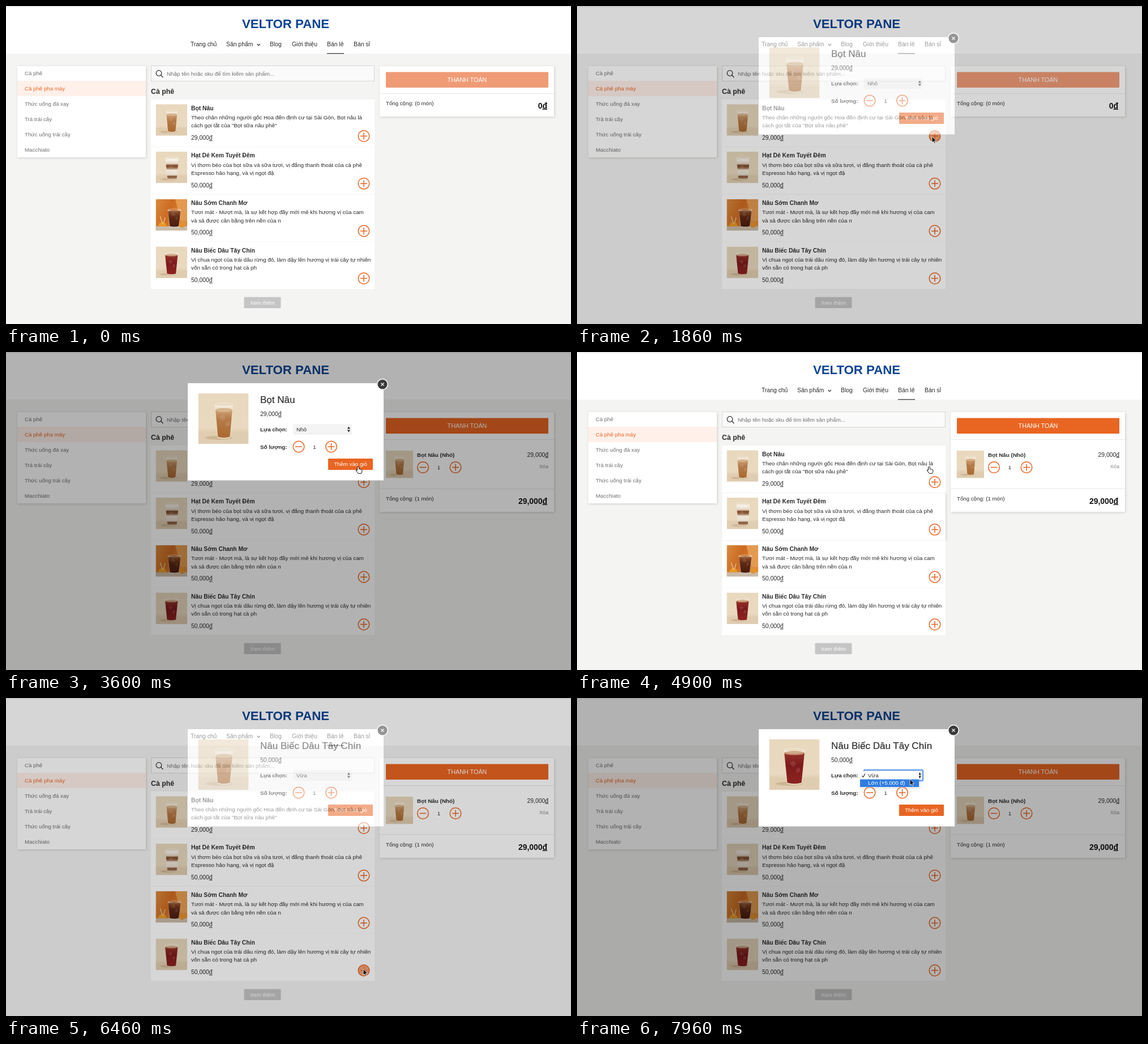
An HTML page for the animation above (8000 ms loop, 998 px wide and 561 px high).

```html
<!DOCTYPE html>
<html lang="vi">
<head>
<meta charset="utf-8">
<title>Bán lẻ</title>
<style>
html, body { margin: 0; width: 100%; height: 100%; overflow: hidden; background: #f4f4f3; }
svg { display: block; }
text { font-family: "Liberation Sans", Arial, sans-serif; white-space: pre; }
.card { fill: #fff; filter: drop-shadow(1px 1px 2px rgba(0, 0, 0, .16)); }
</style>
</head>
<body>
<svg id="stage" width="998" height="561" viewBox="0 0 998 561">
  <defs>
    <linearGradient id="wall" x2="0" y2="1">
      <stop stop-color="#e8d8bd"/><stop offset=".68" stop-color="#e9d9c0"/><stop offset=".78" stop-color="#e0cdb0"/><stop offset="1" stop-color="#dfcdb2"/>
    </linearGradient>
    <linearGradient id="sun" x2="1" y2=".4">
      <stop stop-color="#d98a3c"/><stop offset=".5" stop-color="#cc6a22"/><stop offset="1" stop-color="#e08a3a"/>
    </linearGradient>
    <linearGradient id="milk" x2="0" y2="1">
      <stop stop-color="#cda277"/><stop offset=".3" stop-color="#b67c4b"/><stop offset="1" stop-color="#a9682f"/>
    </linearGradient>
    <linearGradient id="layers" x2="0" y2="1">
      <stop stop-color="#f3ece2"/><stop offset=".18" stop-color="#e6d6c4"/><stop offset=".28" stop-color="#7a4526"/><stop offset=".4" stop-color="#9a6a48"/><stop offset=".52" stop-color="#efe6da"/><stop offset=".76" stop-color="#e8dccd"/><stop offset=".86" stop-color="#7d4a2b"/><stop offset="1" stop-color="#c9ad92"/>
    </linearGradient>
    <linearGradient id="cola" x2="0" y2="1">
      <stop stop-color="#8a4a26"/><stop offset=".4" stop-color="#5c2814"/><stop offset="1" stop-color="#4a1d10"/>
    </linearGradient>
    <linearGradient id="berry" x2="0" y2="1">
      <stop stop-color="#92332a"/><stop offset=".4" stop-color="#7e1a1b"/><stop offset="1" stop-color="#8c2420"/>
    </linearGradient>
  </defs>
</svg>
<script>
const ORANGE = '#e96522', INK = '#2b2b2b', GREY = '#707070';
const DONG = '<tspan text-decoration="underline">đ</tspan>';
const stage = document.getElementById('stage');

const text = (x, y, s, size = 9.85, fill = INK, extra = '') =>
  `<text x="${x}" y="${y}" font-size="${size}" fill="${fill}" ${extra}>${s}</text>`;
const BOLD = 'font-weight="700" ', MID = 'text-anchor="middle" ', END = 'text-anchor="end" ';
const rect = (x, y, w, h, fill, extra = '') =>
  `<rect x="${x}" y="${y}" width="${w}" height="${h}" fill="${fill}" ${extra}/>`;
const path = (d, stroke, width = 1, fill = 'none') =>
  `<path d="${d}" stroke="${stroke}" stroke-width="${width}" fill="${fill}"/>`;
const ring = (x, y, plus = true) =>
  `<circle cx="${x}" cy="${y}" r="9.8" fill="none" stroke="${ORANGE}" stroke-width="1.5"/>` +
  path(`M${x - 6} ${y}h12` + (plus ? `M${x} ${y - 6}v12` : ''), ORANGE, 1.5);
const photo = (kind, x, y, size, extra = '') =>
  `<use href="#${kind}" width="${size}" height="${size}" x="${x}" y="${y}" ${extra}/>`;

// A tapered glass between left and right, filled from level down to the base.
function drink(id, liquid, foam, left, right, rim, level) {
  const base = 88, mid = (left + right) / 2, half = (right - left) / 2, foot = half * .72;
  const inset = (half - foot) * (level - rim) / (base - rim), fill = half - inset - .5;
  const scene = id === 'citrus'
    ? rect(0, 0, 100, 100, 'url(#sun)') + path('M62 0H100V70H80Z', 'none', 0, '#e39a50') + rect(0, 86, 100, 14, '#c9bba8') +
      path('M8 86A13 13 0 0 1 34 86Z', 'none', 0, '#e79a25') + path('M22 78L14 55M25 76L30 58', '#e9d6a8', 2) +
      '<circle cx="84" cy="82" r="9" fill="#e2922c"/>'
    : rect(0, 0, 100, 100, 'url(#wall)') + `<ellipse cx="${mid - 10}" cy="${base}" rx="27" ry="4" fill="#b99a72" opacity=".45"/>`;
  return `<symbol id="${id}" viewBox="0 0 100 100">${scene}
    <path d="M${left} ${rim}H${right}L${mid + foot} ${base}Q${mid} ${base + 4} ${mid - foot} ${base}Z" fill="#f5ebdc" opacity=".65"/>
    <path d="M${mid - fill} ${level}H${mid + fill}L${mid + foot - 1} ${base - 2}Q${mid} ${base + 2} ${mid - foot + 1} ${base - 2}Z" fill="url(#${liquid})"/>
    <ellipse cx="${mid}" cy="${level}" rx="${fill}" ry="4" fill="${foam}"/>
    <path d="M${mid - 10} 47l8-5 6 7-7 6zM${mid + 3} 59l7-4 2 8-7 4z" fill="#fff" opacity=".1"/>
    <ellipse cx="${mid}" cy="${rim}" rx="${half}" ry="4" fill="none" stroke="#fff" opacity=".5"/></symbol>`;
}

const products = [
  ['latte', 'Bọt Nâu', 'Theo chân những người gốc Hoa đến định cư tại Sài Gòn, Bọt nâu là', 'cách gọi tắt của "Bọt sữa nâu phê"', '29,000'],
  ['layered', 'Hạt Dẻ Kem Tuyết Đêm', 'Vị thơm béo của bọt sữa và sữa tươi, vị đắng thanh thoát của cà phê', 'Espresso hảo hạng, và vị ngọt đậ', '50,000'],
  ['citrus', 'Nâu Sớm Chanh Mơ', 'Tươi mát - Mượt mà, là sự kết hợp đầy mới mẻ khi hương vị của cam', 'và sả được cân bằng trên nền của n', '50,000'],
  ['red', 'Nâu Biếc Dâu Tây Chín', 'Vị chua ngọt của trái dâu rừng đỏ, làm dậy lên hương vị trái cây tự nhiên', 'vốn sẵn có trong hạt cà ph', '50,000']
];

const header = rect(0, 0, 998, 84, '#fff') + rect(0, 0, 998, 2, '#ebebeb') +
  text(494, 38.5, 'VELTOR PANE', 22.2, '#0b4394', BOLD + MID) +
  [[326, 'Trang chủ'], [389, 'Sản phẩm'], [466, 'Blog'], [505, 'Giới thiệu'], [567, 'Bán lẻ'], [614, 'Bán sỉ']]
    .map(([x, s]) => text(x, 71, s, 10.4)).join('') +
  path('M443.5 67l2.7 2.7 2.7-2.7', INK, 1.3) + rect(567, 83, 30, 1.5, '#555');

const sidebar = '<rect class="card" x="20" y="106" width="227" height="161"/>' + rect(20, 132, 227, 27, '#fff0ea') +
  ['Cà phê', 'Cà phê pha máy', 'Thức uống đá xay', 'Trà trái cây', 'Thức uống trái cây', 'Macchiato']
    .map((s, i) => text(33, 122 + 27 * i, s, 9.7, i === 1 ? ORANGE : GREY)).join('');

const list = rect(256.5, 105.5, 394, 27, '#fafafa', 'stroke="#d6d6d6"') +
  `<circle cx="270" cy="118.5" r="4.8" fill="none" stroke="${INK}" stroke-width="1.2"/>` + path('M273.5 122l4 4', INK, 1.3) +
  text(284, 122.5, 'Nhập tên hoặc sku để tìm kiếm sản phẩm...', 9.85, GREY) +
  text(256, 155, 'Cà phê', 12.3, INK, BOLD) +
  '<rect id="hover" class="card" x="257" y="249" width="394" height="83"/>' +
  products.map(([kind, name, line1, line2, price], i) => {
    const y = 165 + 83.7 * i;
    return rect(256, y, 395, 83, '#fff') + photo(kind, 264.5, y + 8.3, 55.5) +
      text(327, y + 18.5, name, 10.3, INK, BOLD) + text(327, y + 34.8, line1) + text(327, y + 49.2, line2) +
      text(327, y + 71, price + DONG, 10.4) + ring(632, y + 64.5);
  }).join('') +
  [0, 251.1].map((dy, i) => `<circle id="press${i}" cx="632" cy="${229.5 + dy}" r="10" fill="${ORANGE}" opacity="0"/>`).join('') +
  rect(420.5, 513.5, 65, 19.5, '#c5c5c5', 'rx="1"') + text(453, 526.5, 'Xem thêm', 9.7, '#fff', MID);

const cart = (count, height, sum, active) => {
  const bottom = 106 + height;
  return `<g id="cart${count}"><rect class="card" x="660" y="106" width="308" height="${height}"/>` +
    rect(671, 116.5, 287, 27.5, active ? ORANGE : '#ef9b76', 'rx="1"') + text(814.5, 134.3, 'THANH TOÁN', 10.8, '#fff', MID) +
    rect(660, 154, 308, 1, '#e8e8e8') + text(671, bottom - 20, `Tổng cộng: (${count} món)`, 9.7) +
    text(956, bottom - 14.5, sum + DONG, 13.9, '#111', BOLD + END) +
    (active ? photo('latte', 670.5, 174, 48.5) + text(726, 184.5, products[0][1] + ' (Nhỏ)', 9.9, INK, BOLD) +
      ring(736.5, 203.5, false) + text(764.5, 207, '1', 9.85, INK, MID) + ring(794, 203.5) +
      text(958, 184.5, sum + DONG, 10.4, INK, END) + text(958, 205, 'Xóa', 9.2, '#888', END) + rect(660, 240.5, 308, 1, '#e8e8e8') : '') + '</g>';
};

// Shade and dialog fade as one layer.
const modal = '<g id="modal">' + rect(0, 0, 998, 561, '#000', 'opacity=".3"') + rect(321, 55, 346, 171.5, '#fff') +
  photo('latte', 339.5, 73, 89, 'id="picture"') +
  text(449, 90, '', 17, INK, 'id="name" stroke="#2b2b2b" stroke-width=".2"') + text(449, 113, '', 10.4, INK, 'id="price"') +
  text(449, 139.5, 'Lựa chọn:', 9.85, INK, BOLD) + rect(507, 127, 104, 19, '#f3f3f3', 'id="select" rx="2"') +
  text(513, 140, '', 9.85, INK, 'id="option"') + path('M602.8 135.5l2.6-4 2.6 4zM602.8 137.5l2.6 4 2.6-4z', 'none', 0, INK) +
  text(449, 170.5, 'Số lượng:', 9.85, INK, BOLD) + ring(517, 167, false) + text(545, 170.7, '1', 9.85, INK, MID) + ring(574.5, 167) +
  rect(569, 188, 79, 20, ORANGE, 'rx="1"') + text(608.5, 201.3, 'Thêm vào giỏ', 9.7, '#fff', MID) +
  '<circle cx="665" cy="57" r="9.3" fill="#3a3a3a" stroke="#fff" stroke-width="1.5"/>' + path('M662.5 54.5l5 5m0-5l-5 5', '#fff', 1.2) + '</g>';

const menu = '<g id="menu"><rect class="card" x="500" y="129" width="104" height="28.5" rx="1"/>' +
  rect(500, 143.5, 104, 13.5, '#2f7de1', 'id="mark"') + path('M503.5 137l2 2.5 3.5-6', INK, 1.2) +
  text(514, 140, 'Vừa', 9.85, INK, 'id="medium"') + text(514, 153.3, 'Lớn (+5.000 đ)', 9.85, '#fff', 'id="large"') + '</g>';

// Both pointers have their tip at the local origin.
const cursor = '<g id="cursor"><path id="arrow" d="M0 0V11L2.5 8.7 4.3 12.5 6 11.7 4.3 8H7.8Z" fill="#111" stroke="#fff" stroke-width=".8"/>' +
  '<path id="hand" d="M-1.5 1Q0-1 1.3 1V4.5Q2.5 3.8 3.5 5 4.5 4.3 5.3 5.5 6.8 5.3 7 6.8 7 10 5.5 12.3H.3L-3.8 7Q-3.8 5-1.5 6.7Z" fill="#fff" stroke="#111"/></g>';

stage.insertAdjacentHTML('beforeend',
  drink('latte', 'milk', '#d6b48e', 33, 69, 23, 33) + drink('layered', 'layers', '#f4eee6', 30, 74, 20, 27) +
  drink('citrus', 'cola', '#8d5530', 38, 80, 34, 39) + drink('red', 'berry', '#c99a78', 29, 71, 22, 27) +
  header + sidebar + list + cart(0, 89, '0', false) + cart(1, 176, '29,000', true) +
  modal + photo('latte', 0, 0, 89, 'id="flyer" opacity=".5"') + menu + cursor);

const el = Object.fromEntries([...stage.querySelectorAll('[id]')].map(n => [n.id, n]));
const set = (id, attrs) => { for (const k in attrs) el[id].setAttribute(k, attrs[k]); };
const show = (id, on) => set(id, { visibility: on ? 'visible' : 'hidden' });
const ramp = (t, a, b) => Math.min(1, Math.max(0, (t - a) / (b - a)));
const ease = p => p * p * (3 - 2 * p);
const mix = (a, b, p) => a + (b - a) * p;

// time, x, y, pointer is a hand
const moves = [
  [600, 946, 374, 0], [800, 629, 231, 1], [830, 627, 230, 1], [1800, 627, 230, 0], [2530, 627, 230, 1], [2730, 627, 230, 1],
  [2960, 622, 202, 1], [4910, 622, 202, 0], [5240, 630, 476, 1], [5460, 630, 476, 0], [5530, 726, 482, 0],
  [5630, 527, 474, 0], [5700, 629, 476, 1], [5860, 629, 476, 1], [6100, 631, 478, 1], [6400, 631, 478, 0],
  [7140, 631, 478, 0], [7530, 604, 131, 0], [7780, 604, 131, 0], [7960, 588, 143, 0], [8000, 588, 143, 0]
];

function render(t) {
  const second = t >= 6380, start = second ? 6380 : 1780;
  const fade = t >= 3800 && !second ? 0 : ramp(t, start, start + 150);
  const added = t >= 3590, open = t >= 7540, large = t >= 7870;
  const item = products[second ? 3 : 0];

  set('modal', { opacity: fade });
  set('picture', { href: t >= 6500 ? '#red' : '#latte' });
  el.name.textContent = item[1];
  el.price.innerHTML = item[4] + DONG;
  el.option.textContent = second ? 'Vừa' : 'Nhỏ';

  show('cart0', !added);
  show('cart1', added);
  show('hover', t >= 3800 && t < 6400);
  set('press0', { opacity: t < 1930 ? .6 * ramp(t, 1080, 1160) : 0 });
  set('press1', { opacity: t >= 6400 && t < 6530 ? .6 : 0 });

  const fly = ease(ramp(t, 3150, 3590)), size = mix(89, 48.5, fly);
  show('flyer', t >= 3160 && !added);
  set('flyer', { x: mix(339.5, 670.5, fly), y: mix(73, 174, fly), width: size, height: size });

  set('select', { stroke: open ? '#6ba5ee' : 'none', 'stroke-width': 2.5 });
  show('menu', open);
  set('mark', { y: large ? 143.5 : 129.5 });
  set('medium', { fill: large ? INK : '#fff' });
  set('large', { fill: large ? '#fff' : INK });

  show('arrow', false);
  show('hand', false);
  if (t < moves[0][0]) return;
  const i = moves.findIndex((m, k) => t < moves[k + 1][0]);
  const [t0, x0, y0, hand] = moves[i], [t1, x1, y1] = moves[i + 1];
  const p = ease(ramp(t, t0, t1));
  set('cursor', { transform: `translate(${mix(x0, x1, p)} ${mix(y0, y1, p)})` });
  show(hand ? 'hand' : 'arrow', true);
}

function tick() {
  render(performance.now() % 8000);
  requestAnimationFrame(tick);
}
tick();
</script>
</body>
</html>
```
